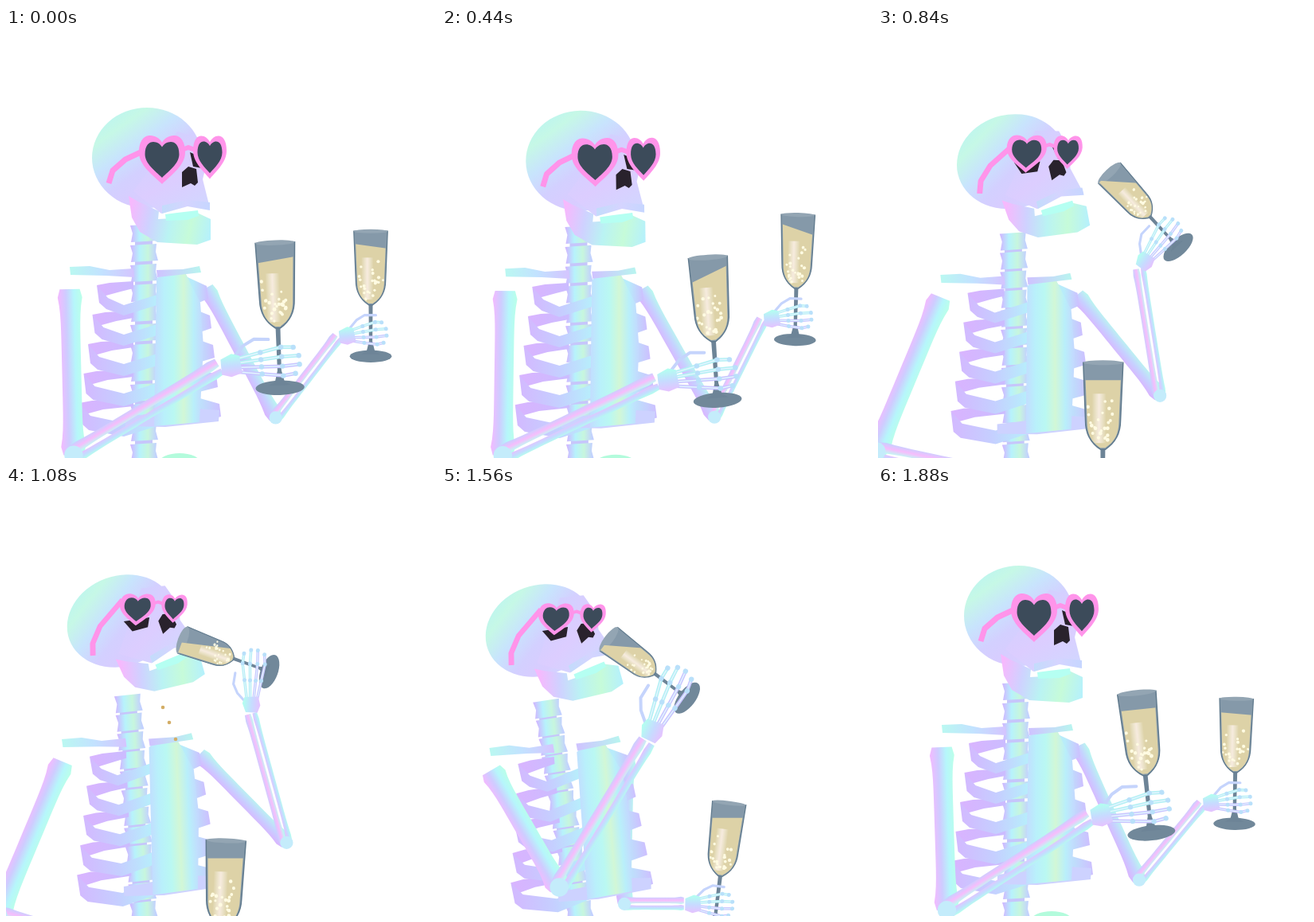
These frames come from a looping animation (540 by 540 pixels, 1.92 s). An HTML page with a canvas:

```html
<!DOCTYPE html>
<html lang="en">
<head>
<meta charset="utf-8">
<title>Skeleton with champagne</title>
<style>
html, body { margin: 0; width: 100%; height: 100%; overflow: hidden; background: #fff; }
canvas { display: block; width: 540px; height: 540px; }
</style>
</head>
<body>
<canvas id="stage" width="540" height="540"></canvas>
<script>
const c = document.getElementById('stage').getContext('2d');
const LOOP = 1920, STEP = 40;

// head: x, y, tilt back 0..1; near and far: grip x, grip y, lean of the glass in degrees.
// Chest, shoulders, elbows and wrists all follow from these.
const KEYS = [
  { at: 0, head: [0, 0, 0], near: [343, 419, 2], far: [458, 384, 0] },
  { at: 280, head: [-23, 2, 0], near: [364, 396, 5], far: [447, 355, 5] },
  { at: 600, head: [20, 5, 0], near: [316, 488, 2], far: [434, 367, -4] },
  { at: 1080, head: [-26, 2, 1], near: [271, 597, -2], far: [311, 226, 70] },
  { at: 1360, head: [22, 15, 0], near: [313, 459, -3], far: [378, 512, -8] },
  { at: 1560, head: [-48, 14, 1], near: [290, 253, 53], far: [345, 526, -7] },
  { at: 1880, head: [0, 0, 0], near: [340, 404, 6], far: [448, 396, -1] }
];
// Glass length, hand reach, shrink when raised, slosh in degrees, bone width
const NEAR = { glass: 185, reach: 75, shrink: .42, slosh: -42, bone: 13, hand: 1, seed: 5 };
const FAR = { glass: 157, reach: 41, shrink: .28, slosh: 30, bone: 9, hand: .78, seed: 40 };

const key = i => KEYS[(i + KEYS.length) % KEYS.length];
const keyTime = i => key(i).at + LOOP * Math.floor(i / KEYS.length);

// Smooth cyclic spline through the keys.
function sample(name, t) {
  let i = KEYS.length - 1;
  while (KEYS[i].at > t) i--;
  const val = (k, j) => key(k)[name][j];
  const rate = (k, j) => {
    const a = keyTime(k) - keyTime(k - 1), b = keyTime(k + 1) - keyTime(k);
    const before = (val(k, j) - val(k - 1, j)) / a, after = (val(k + 1, j) - val(k, j)) / b;
    return (b * before + a * after) / (a + b);
  };
  const h = keyTime(i + 1) - keyTime(i), u = (t - keyTime(i)) / h, v = 1 - u;
  return [0, 1, 2].map(j =>
    (1 + 2 * u) * v * v * val(i, j) + u * v * v * h * rate(i, j) +
    u * u * (3 - 2 * u) * val(i + 1, j) - u * u * v * h * rate(i + 1, j));
}

const rad = d => d * Math.PI / 180;
const noise = n => { const v = Math.sin(n * 127.1) * 43758.5; return v - Math.floor(v); };
const turned = (x, y, a) => [x * Math.cos(a) - y * Math.sin(a), x * Math.sin(a) + y * Math.cos(a)];

function grad(x0, y0, x1, y1, cols) {
  const g = c.createLinearGradient(x0, y0, x1, y1);
  cols.forEach((col, i) => g.addColorStop(i / (cols.length - 1), col));
  return g;
}

function trace(p) {
  c.beginPath();
  for (let i = 0; i < p.length; i += 2) c.lineTo(p[i], p[i + 1]);
}

function poly(p, fill) {
  trace(p);
  c.fillStyle = fill;
  c.fill();
}

function line(p, width, col) {
  trace(p);
  c.lineWidth = width;
  c.strokeStyle = col;
  c.stroke();
}

function ellipse(x, y, rx, ry, fill) {
  c.beginPath();
  c.ellipse(x, y, rx, ry, 0, 0, 7);
  c.fillStyle = fill;
  c.fill();
}

function placed(x, y, angle, draw) {
  c.save();
  c.translate(x, y);
  c.rotate(angle);
  draw();
  c.restore();
}

function bone([ax, ay], [bx, by], w, cols) {
  const len = Math.hypot(bx - ax, by - ay), side = [], back = [];
  for (let u = 0; u <= 1.001; u += .05) {
    const knob = Math.pow(Math.abs(2 * u - 1), 6) * .22 - Math.pow(Math.abs(2 * u - 1), 40) * .2;
    side.push(u * len, -w * (.4 + knob));
    back.unshift(u * len, w * (.4 + knob));
  }
  placed(ax, ay, Math.atan2(by - ay, bx - ax), () =>
    poly(side.concat(back), grad(0, w / 2, 0, -w / 2, cols)));
}

function forearm(a, b, w) {
  const ang = Math.atan2(b[1] - a[1], b[0] - a[0]);
  const shift = (p, d) => [p[0] - Math.sin(ang) * d, p[1] + Math.cos(ang) * d];
  bone(shift(a, w / 2), shift(b, w / 2), w * .75, ['#b4ffee', '#c4dcff', '#e4c2ff']);
  bone(shift(a, -w / 2), shift(b, -w / 2), w, ['#bffaf3', '#f6bdfc', '#c8d0ff']);
  ellipse(a[0], a[1], w * .9, w * .9, '#c4ecfb');
}

function hand(w, grip, s) {
  const len = Math.hypot(grip[0] - w[0], grip[1] - w[1]) / s + 26;
  placed(w[0], w[1], Math.atan2(grip[1] - w[1], grip[0] - w[0]), () => {
    c.scale(s, s);
    c.lineCap = c.lineJoin = 'round';
    line([16, -8, 32, -24, 46, -31, 64, -29], 4, '#c5d4fc');
    for (let k = -1.5; k < 2; k++) {
      const p = [18, k * 5, len * .52, k * 9, len * .78, k * 12, len - 3 * k * k, k * 11];
      line(p, 4.5, k % 1 > 0 ? '#c9c6ff' : '#b4f0f4');
      line(p, 1.5, '#e2f5ff');
      for (let j = 2; j < 8; j += 2) ellipse(p[j], p[j + 1], 3.2, 3.2, '#b9e0fa');
    }
    poly([2, -9, 16, -15, 26, -12, 28, 10, 14, 14, 2, 10],
      grad(0, 14, 0, -14, ['#e6c2ff', '#c6dcff', '#b2fff0']));
  });
}

function bowl(inset) {
  const r = 25 - inset, low = -76 - inset;
  c.beginPath();
  c.moveTo(-r, -185);
  c.lineTo(3 - r, -112);
  c.bezierCurveTo(3 - r, -92, -12, low - 6, -3, low);
  c.lineTo(3, low);
  c.bezierCurveTo(12, low - 6, r - 3, -92, r - 3, -112);
  c.lineTo(r, -185);
  c.closePath();
}

function glass({ foot, lean, size, slope, up }, seed, t) {
  placed(foot[0], foot[1], -lean, () => {
    c.scale(size * (1 + .15 * up), size);
    ellipse(0, 0, 31, 9 + 9 * up, '#71889a');
    poly([-3, -80, 3, -80, 2.5, -22, 6, -8, 14, -3, -14, -3, -6, -8, -2.5, -22], '#6d8497');
    bowl(0);
    c.fillStyle = '#8599a9';
    c.fill();
    c.lineWidth = 1.5;
    c.strokeStyle = '#607a8d';
    c.stroke();
    ellipse(0, -185, 25, 3 + 7 * up, '#93a5b3');
    bowl(2);
    c.clip();
    placed(0, -163, lean + slope, () => {
      c.fillStyle = '#ddd2a7';
      c.fillRect(-250, 0, 500, 350);
    });
    c.fillStyle = grad(-14, 0, 4, 0, ['#fff0', '#fff3f0c0', '#fff0']);
    c.fillRect(-14, -146, 18, 62);
    for (let i = 0; i < 24; i++) {
      const u = (noise(i + seed) + t / LOOP * (1 + i % 2)) % 1;
      const y = -84 - 62 * u * (.35 + .65 * noise(i * 3 + seed));
      const x = (noise(i * 7 + seed) - .5) * Math.min(38, 14 + (-84 - y) * 1.2);
      const r = 1.5 + noise(i + 9);
      ellipse(x, y, r, r, '#fffbe2');
    }
  });
}

// Solves a whole arm from the grip: glass, wrist, then the elbow between two bone lengths.
function solveArm(spec, [x, y, deg], shoulder, upper, fore, t) {
  const lean = rad(deg), up = Math.max(0, Math.sin(lean));
  const len = spec.glass * (1 - spec.shrink * up);
  const grip = [x, y], foot = [x + .18 * len * Math.sin(lean), y + .18 * len * Math.cos(lean)];
  const [wx, wy] = turned(-spec.reach - (spec === FAR ? 20 * up : 0), 4, -lean * (1 + .2 * up));
  const wrist = [x + wx, y + wy];
  const dx = wrist[0] - shoulder[0], dy = wrist[1] - shoulder[1], d = Math.hypot(dx, dy);
  const a = upper(up), b = fore(wrist[1]);
  const along = (a * a - b * b + d * d) / (2 * d), out = Math.sqrt(Math.max(0, a * a - along * along));
  const elbow = [shoulder[0] + (dx * along - dy * out) / d, shoulder[1] + (dy * along + dx * out) / d];
  const gap = (t - 280 + LOOP * 1.5) % LOOP - LOOP / 2;
  const slope = rad(spec.slosh * Math.exp(-((gap / 240) ** 2)) + 9 * up);
  return { shoulder, elbow, wrist, grip, foot, lean, up, slope, size: len / 185 };
}

function lowerArm(arm, spec, t) {
  forearm(arm.elbow, arm.wrist, spec.bone);
  glass(arm, spec.seed, t);
  hand(arm.wrist, arm.grip, spec.hand);
}

function spine(nx, ny) {
  for (let y = 258; y < 560; y += 25) {
    const u = (540 - y) / 255;
    placed(173 + nx * u, y + ny * u, nx / 400, () => {
      poly([-11, 8, 11, 8, 11, 18, -11, 18], '#c6c6fb');
      poly([-17, -10, 16, -12, 15, -2, 18, 9, -16, 11, -14, 0],
        grad(-16, 0, 16, 0, ['#cfb8ff', '#b7f2fc', '#c7f6dd', '#c2d0ff']));
    });
  }
}

// Calls draw(top, tip, height) for each rib from the top down.
function eachRib(draw) {
  for (let i = 0; i < 5; i++) draw(320 + 37 * i, 114 - 5.5 * i, 13 + i, i);
}

function chest() {
  eachRib((y, x, h, i) => {
    poly([160, y - 2, 160, y + 7, x + 30, y + 11, x + 8, y + 17, x, y + 3, x + 16, y],
      grad(x, 0, 160, 0, ['#d9b4ff', '#cbbcff']));
    const r = 254 + 4 * i;
    poly([226, y - 8, r - 2, y + 4, r, y + 20, 235, y + 28], grad(235, 0, r, 0, ['#b8ecfa', '#cdbfff']));
  });
  eachRib((y, x, h) =>
    poly([x, y + 3, x + 14, y + 19, 148, y + 28, 193, y + 14, 193, y + 14 + h,
      148, y + 28 + h, x + 12, y + 20 + h, x + 3, y + 12 + h],
      grad(x, 0, 195, 0, ['#d3b9ff', '#c5cfff', '#b5f3fb'])));
  poly([150, 488, 240, 478, 268, 480, 267, 494, 200, 501, 150, 500], '#cdd2ff');
  poly([189, 315, 198, 306, 224, 305, 244, 345, 248, 400, 243, 495, 186, 500],
    grad(186, 0, 248, 0, ['#c3dcff', '#b9f0fb', '#baf8f2', '#d2f7d6', '#b9effa', '#c4d7ff']));
  poly([80, 300, 105, 299, 130, 304, 160, 302, 161, 313, 126, 311, 81, 310],
    grad(80, 0, 160, 0, ['#baf8f1', '#c2e2ff', '#d4c5ff']));
  poly([189, 304, 222, 303, 243, 299, 245, 307, 190, 313], grad(190, 0, 246, 0, ['#cfc3ff', '#b8f6ef']));
}

function heart(x, y, w, h) {
  for (const [k, fill] of [[1, '#ff94ea'], [.74, '#3c4b5a']]) {
    c.save();
    c.translate(x, y);
    c.scale(w * k, h * k);
    c.beginPath();
    c.moveTo(0, -.34);
    for (const s of [1, -1]) {
      const from = s > 0 ? [.1, -.52, .5, -.6, .5, -.14] : [-.2, .32, -.5, .12, -.5, -.14];
      const to = s > 0 ? [.5, .12, .2, .32, 0, .5] : [-.5, -.6, -.1, -.52, 0, -.34];
      c.bezierCurveTo(...from);
      c.bezierCurveTo(...to);
    }
    c.fillStyle = fill;
    c.fill();
    c.restore();
  }
}

function glasses(look, m) {
  c.lineCap = 'butt';
  c.lineJoin = 'round';
  line([182 + 6 * m, 150 - 14 * m, 150, 165 - 5 * m, 134, 179, 129, 195], 7, '#ff94ea');
  placed(256 + .15 * look - 11 * m, 162 + .15 * look + 10 * m, rad(23 * m), () => {
    c.scale((1 - .005 * look) * (1 - .22 * m), 1 - .28 * m);
    line([-38, -8, -27, -12, -16, -8], 6, '#ff94ea');
    heart(0, 0, 42, 55);
    heart(-60, 3, 58, 62);
  });
}

function head([x, y, m]) {
  const look = x * (1 - m), dark = '#29222c';
  placed(180 + x, 185 + y, rad(.3 * look - 20 * m), () => {
    c.scale(1, 1 - .1 * m);
    c.translate(-180, -185);
    ellipse(177, 163, 69, 63, grad(120, 105, 205, 225,
      ['#b9f4f4', '#c6f8e6', '#c8e4fd', '#d3d0ff', '#d9ccff', '#cfd8ff']));
    placed(158, 215, rad(4 * m), () => {
      c.translate(-158, -215);
      poly([154, 211, 166, 218, 192, 230, 191, 240, 228, 238, 240, 232, 257, 240, 257, 266,
        240, 272, 190, 269, 168, 256, 158, 238],
        grad(155, 235, 257, 255, ['#f6b9fd', '#cfd2ff', '#baf3f3', '#c6fbd9', '#b6f1fb']));
      poly([200, 234, 215, 232, 241, 229, 242, 236, 228, 241, 201, 242], '#b5fff2');
    });
    poly([160, 205, 215, 130, 244, 138, 252, 170, 247, 190, 256, 226, 228, 222, 195, 233],
      grad(190, 150, 235, 230, ['#d3d0ff', '#dccdff', '#d2d6ff']));
    poly([196, 223, 228, 216, 256, 219, 256, 229, 228, 224, 196, 233],
      grad(196, 0, 256, 0, ['#c3dcfb', '#d5d4ff', '#c6d6ff']));
    poly([221, 181, 229, 174, 239, 177, 241, 194, 237, 198, 232, 195, 221, 200], dark);
    poly([231, 156, 240, 160, 246, 176, 235, 174], dark);
    if (m > .3) poly([180, 165, 212, 172, 206, 184, 186, 182], dark);
    glasses(look, m);
  });
}

function drops(t) {
  for (let i = 0; i < 3; i++) {
    const d = t - 845 - 35 * i;
    if (d > 0 && d < 260) ellipse(213 - 8 * i, 215 + d * .25 + d * d * .0008, 2.3, 2.3, '#d3ad66');
  }
}

function draw(t) {
  const pose = sample('head', t);
  const tilt = pose[2] = Math.max(0, Math.min(1, pose[2]));
  const nx = .58 * pose[0] - .004 * pose[0] ** 2, ny = .5 * pose[1] + 13 * tilt, sway = nx / 425;
  const onChest = (x, y) => {
    const p = turned(x - 173, y - 540, sway);
    return [p[0] + 173, p[1] + 540 + ny];
  };
  const near = solveArm(NEAR, sample('near', t), onChest(80, 328), up => 210 - 50 * up, () => 214, t);
  const far = solveArm(FAR, sample('far', t), onChest(252, 326), up => 185 - 31 * up,
    y => 168 - .39 * (y - 286), t);

  c.clearRect(0, 0, 540, 540);
  bone(far.shoulder, far.elbow, 20, ['#d9b5ff', '#c6d2ff', '#b9f8ef']);
  spine(nx, ny);
  ellipse(218, 546 + ny, 26, 12, '#b3fbdc');
  placed(173, 540 + ny, sway, () => {
    c.translate(-173, -540);
    chest();
  });
  bone(near.shoulder, near.elbow, 30, ['#f2baff', '#cfccff', '#b6f6fb', '#baffe9']);
  head(pose);
  lowerArm(far, FAR, t);
  lowerArm(near, NEAR, t);
  drops(t);
}

const start = performance.now();
function frame() {
  const t = (performance.now() - start) % LOOP;
  draw(Math.floor(t / STEP) * STEP);
  requestAnimationFrame(frame);
}
frame();
</script>
</body>
</html>
```
